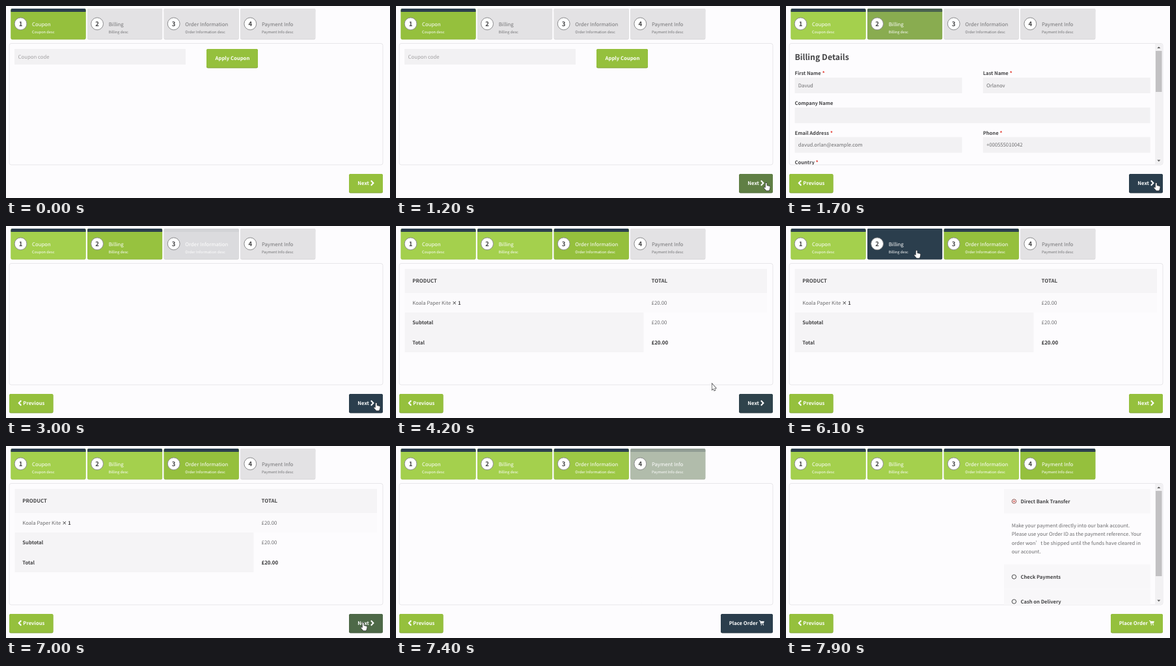
An HTML page with a canvas for the animation above (8 s loop, 590 by 295 pixels).

```html
<!DOCTYPE html>
<html lang="en">
<head>
<meta charset="utf-8">
<title>Checkout steps</title>
<style>
html, body { margin: 0; width: 100%; height: 100%; overflow: hidden; background: #fdfcfe; }
canvas { display: block; width: 590px; height: 295px; }
</style>
</head>
<body>
<canvas></canvas>
<script>
const LOOP = 8000, FADE = 300;
const PAGE = [253, 252, 254], GREY = [227, 226, 228], GREEN = [149, 192, 61],
  LIME = [164, 208, 77], DARK = [43, 62, 77], WHITE = [255, 255, 255], MUTED = [116, 116, 118];
const INK = '#444446', BODY = '#6c6c6e', FIELD = '#f2f1f3', SHADE = '#f5f4f6';
const FONT = '"Noto Sans CJK SC", "Noto Sans CJK JP", "Noto Sans CJK", "Open Sans", sans-serif';

const canvas = document.querySelector('canvas');
const ctx = canvas.getContext('2d');
const dpr = window.devicePixelRatio || 1;
canvas.width = 590 * dpr;
canvas.height = 295 * dpr;

let now = 0;
const ramp = (from, to) => Math.min(1, Math.max(0, (now - from) / (to - from)));
const pulse = (on, off) => ramp(on, on + FADE) - ramp(off, off + FADE);
const mix = (a, b, k) => a.map((v, i) => v + (b[i] - v) * k);
const rgb = c => `rgb(${c.map(Math.round).join(',')})`;

function box(x, y, w, h, fill, r = 0) {
  ctx.fillStyle = fill;
  ctx.beginPath();
  ctx.roundRect(x, y, w, h, r);
  ctx.fill();
}

function text(str, x, y, size, color, bold) {
  ctx.font = `${bold ? 700 : 400} ${size}px ${FONT}`;
  ctx.fillStyle = color;
  ctx.fillText(str, x, y);
  return x + ctx.measureText(str).width;
}

function line(points, color, width, close) {
  ctx.beginPath();
  points.forEach(([x, y]) => ctx.lineTo(x, y));
  if (close) ctx.closePath();
  ctx.strokeStyle = color;
  ctx.lineWidth = width;
  ctx.stroke();
}

function disc(x, y, r, fill, stroke, width = 1) {
  ctx.beginPath();
  ctx.arc(x, y, r, 0, 7);
  ctx.fillStyle = fill;
  ctx.fill();
  ctx.strokeStyle = stroke;
  ctx.lineWidth = width;
  ctx.stroke();
}

function button(label, x, y, w, labelX, dark = 0) {
  const c = mix(GREEN, DARK, dark);
  box(x, y, w, 29.5, rgb(mix(c, [0, 0, 0], .15)), 2.5);
  box(x, y, w, 28.5, rgb(c), 2.5);
  text(label, labelX, y + 17, 7.7, '#fff', true);
}

const chevron = (x, dir) =>
  line([[x, 268.3], [x + 3.6 * dir, 272], [x, 275.7]], '#fff', 2);

// Step tabs: label, time of activation, hover interval
const steps = [
  ['Coupon', -1000],
  ['Billing', 1430, 5450, 6250],
  ['Order Information', 2980, 4600, 5450],
  ['Payment Info', 7300],
];

function drawStep([label, start, over, out], i) {
  const x = 7.5 + 117.6 * i, active = now >= start;
  const done = i < 3 ? ramp(steps[i + 1][1], steps[i + 1][1] + 200) : 0;
  let fill = mix(GREY, mix(GREEN, LIME, done), ramp(start + 50, start + 300));
  fill = mix(fill, DARK, .2 * ramp(start, start + 100) * (1 - ramp(start + 250, start + 450)));
  if (over) fill = mix(fill, DARK, pulse(over, out));
  box(x, 4, 115, 47.5, rgb(mix(fill, [0, 0, 0], .08)), 2);
  box(x, 4, 115, 46.7, rgb(fill), 2);
  box(x, 4, 115, 5, rgb(mix(fill, DARK, ramp(start, start + 400))), [2, 2, 0, 0]);
  disc(x + 15, 27.3, 9.4, '#fff', '#8b8b8d');
  ctx.textAlign = 'center';
  text(i + 1, x + 15, 30.8, 9.6, INK, true);
  ctx.textAlign = 'left';
  const color = rgb(active ? WHITE : MUTED);
  text(label, x + 32.6, 30.5, 7.8, color);
  text(label + ' desc', x + 32.6, 41.6, 5.7, color);
}

function scrollbar(thumbEnd) {
  box(567, 58, 11.5, 185.5, '#f2f1f3');
  box(568, 69, 9.5, thumbEnd - 69, '#c2c1c3');
  for (const [y, d] of [[65, -2.5], [236.5, 2.5]]) {
    ctx.fillStyle = '#555';
    ctx.beginPath();
    ctx.moveTo(570.3, y);
    ctx.lineTo(575.3, y);
    ctx.lineTo(572.8, y + d);
    ctx.fill();
  }
}

function drawCoupon() {
  box(13, 66, 263, 24, FIELD);
  text('Coupon code', 18.5, 80.8, 7.8, '#a3a2a4');
  button('Apply Coupon', 308, 66, 79, 321.5);
}

function field(label, x, y, w, value = '', required = true) {
  const end = text(label, x, y, 7.55, INK, true);
  if (required) text('*', end + 2, y, 7.6, '#e02b20', true);
  box(x, y + 4, w, 24, FIELD);
  text(value, x + 5.3, y + 18.7, 7.7, BODY);
}

function drawBilling() {
  text('Billing Details', 13.5, 83, 12.3, INK, true);
  field('First Name', 13.5, 106, 257, 'Davud');
  field('Last Name', 302.7, 106, 257, 'Orlanov');
  field('Company Name', 13.5, 152, 546, '', false);
  field('Email Address', 13.5, 197.5, 257, 'davud.orlan@example.com');
  field('Phone', 302.7, 197.5, 257, '+000555010042');
  field('Country', 13.5, 243, 546);
  scrollbar(132);
}

function drawOrder() {
  box(13.5, 66, 556.5, 37, SHADE);
  box(13.5, 103, 556.5, 30, '#fbfafc');
  box(13.5, 133, 367, 61, SHADE);
  text('PRODUCT', 25.3, 87.2, 7.75, INK, true);
  text('TOTAL', 392.6, 87.2, 7.75, INK, true);
  text('Koala Paper Kite', 25.3, 120.8, 7.72, BODY);
  text('× 1', 86, 120.8, 7.5, INK, true);
  text('£20.00', 392.6, 120.8, 7.75, BODY);
  text('Subtotal', 25.3, 151.3, 7.65, INK, true);
  text('£20.00', 392.6, 151.3, 7.75, BODY);
  text('Total', 25.3, 181.8, 7.65, INK, true);
  text('£20.00', 392.6, 181.8, 7.75, '#2c2c2e', true);
}

function drawPayment() {
  ['Direct Bank Transfer', 'Check Payments', 'Cash on Delivery'].forEach((label, i) => {
    const y = [66, 182, 220][i];
    box(335, y, 225, 37.5, '#f8f7f9');
    disc(350.4, y + 19, 3.2, '#fff', i ? INK : '#8a4a48');
    if (!i) disc(350.4, y + 19, 1, '#d8433c', '#d8433c', .5);
    text(label, 360.5, y + 21.7, 7.6, INK, true);
  });
  ['Make your payment directly into our bank account.',
   'Please use your Order ID as the payment reference. Your',
   'order won’t be shipped until the funds have cleared in',
   'our account.'].forEach((s, i) => text(s, 346.7, 125 + 13.35 * i, 7.7, BODY));
  scrollbar(200);
}

// Panel contents: painter, start and end of fade-in, end of display
const panels = [
  [drawCoupon, -2, -1, 1250],
  [drawBilling, 1350, 1620, 2960],
  [drawOrder, 3100, 3600, 7200],
  [drawPayment, 7400, 7700, LOOP],
];

function drawPanel() {
  ctx.save();
  ctx.beginPath();
  ctx.roundRect(5, 57.5, 574, 186.5, 3);
  ctx.strokeStyle = '#e8e7ea';
  ctx.lineWidth = 1;
  ctx.stroke();
  ctx.clip();
  for (const [paint, from, full, end] of panels) {
    if (now < from || now >= end) continue;
    ctx.globalAlpha = ramp(from, full);
    paint();
  }
  ctx.restore();
}

function drawCart(x, y) {
  line([[x, y], [x + 1.5, y], [x + 2.7, y + 4.7], [x + 7, y + 4.7]], '#fff', 1);
  ctx.fillStyle = '#fff';
  ctx.beginPath();
  ctx.moveTo(x + 1.8, y + .7);
  ctx.lineTo(x + 7.8, y + .7);
  ctx.lineTo(x + 7, y + 3.6);
  ctx.lineTo(x + 2.4, y + 3.6);
  ctx.fill();
  box(x + 2.5, y + 5.7, 1.5, 1.5, '#fff', .75);
  box(x + 5.7, y + 5.7, 1.5, 1.5, '#fff', .75);
}

function drawButtons() {
  if (now >= 1250) {
    button('Previous', 5, 258, 67.5, 26.3);
    chevron(23.3, -1);
  }
  if (now < 7350) {
    button('Next', 527, 258, 52, 540.3, pulse(1050, 4190) + pulse(6800, LOOP));
    chevron(560.8, 1);
  } else {
    button('Place Order', 499, 258, 80, 511.7, 1 - ramp(7450, 7850));
    drawCart(558, 268.5);
  }
}

// Pointer stops: time, x, y
const path = [
  [900, 590, 262], [1150, 568, 272], [4100, 568, 272], [4200, 486, 243],
  [4600, 335, 44], [5000, 248, 30], [5300, 245.5, 29], [5450, 240, 29],
  [5750, 170, 30], [6000, 172, 32], [6250, 241, 46], [6800, 540, 265],
  [7000, 548, 272], [7350, 548, 272],
];
const HAND = [[0, 0], [1.5, 0], [1.7, 4], [6, 5], [6.6, 6], [6, 9.5], [5, 11.5], [1, 11.5],
  [-2.7, 7.3], [-2, 6.4], [-.3, 7.5]];
const ARROW = [[0, 0], [0, 9], [2, 7.2], [3.4, 10.3], [4.8, 9.6], [3.5, 6.7], [6, 6.5]];

function drawPointer() {
  const i = path.findIndex(p => p[0] > now);
  if (i < 1) return;
  const [a, b] = [path[i - 1], path[i]];
  const [, x, y] = mix(a, b, ramp(a[0], b[0]));
  const onStep = y < 51 && x < 475, onNext = x > 527 && y > 258;
  const shape = onStep || onNext ? HAND : ARROW;
  line(shape.map(([u, v]) => [x + u, y + v]), '#3a3a3e', 1.3, true);
  ctx.fillStyle = '#fff';
  ctx.fill();
}

function draw(time) {
  now = time % LOOP;
  ctx.setTransform(dpr, 0, 0, dpr, 0, 0);
  ctx.textRendering = 'geometricPrecision';
  box(0, 0, 590, 295, rgb(PAGE));
  steps.forEach(drawStep);
  drawPanel();
  drawButtons();
  drawPointer();
}

const began = performance.now();
function frame() {
  draw(performance.now() - began);
  requestAnimationFrame(frame);
}
frame();
</script>
</body>
</html>
```
